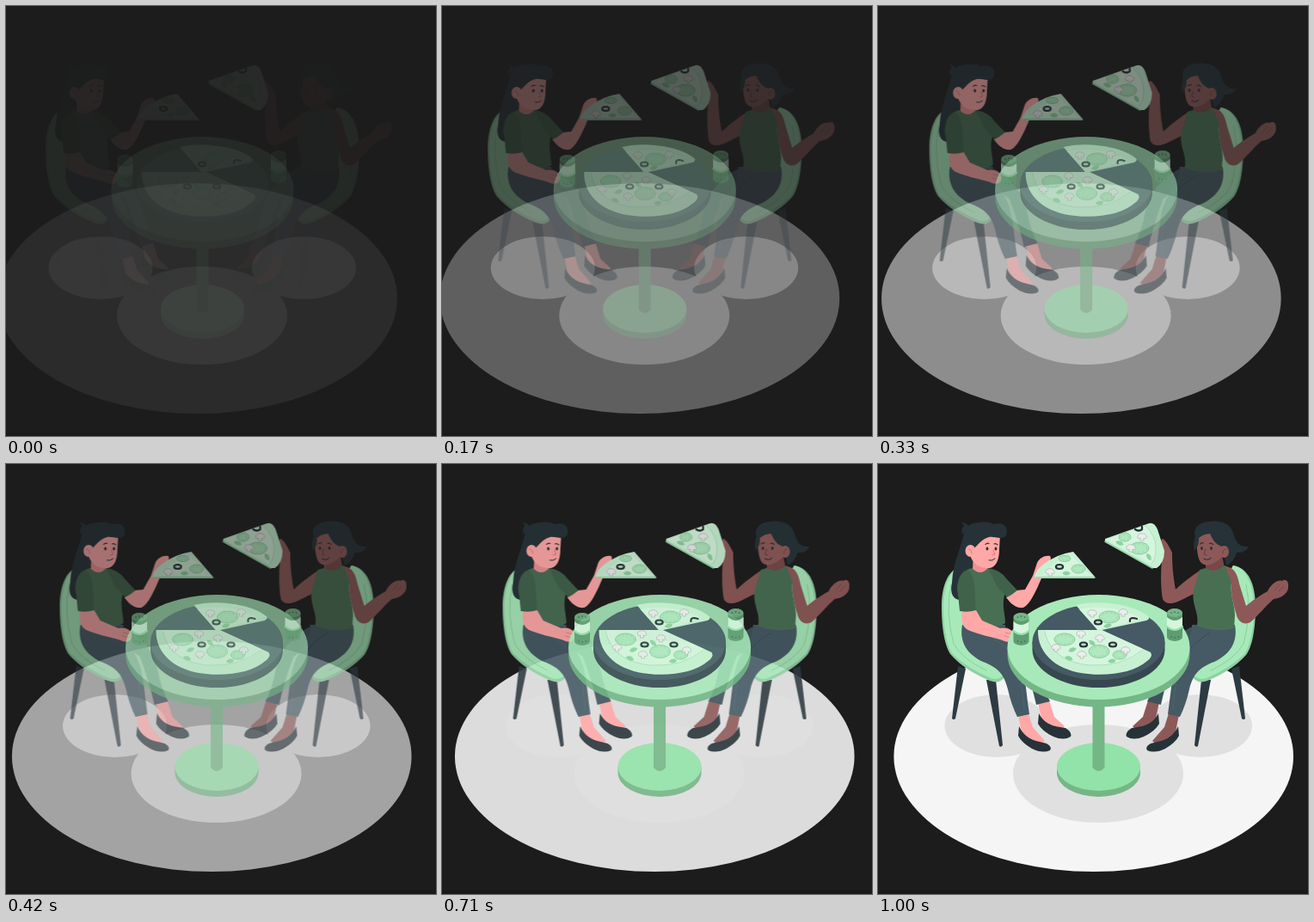
An HTML page that plays this animation: 500 px wide and 500 px high, repeating every 1.04 s.

```html
<!DOCTYPE html>
<html lang="en">
<head>
<meta charset="utf-8">
<title>Pizza for two</title>
<style>
  html, body { margin: 0; width: 100%; height: 100%; overflow: hidden; background: #1c1c1c; }
  svg { display: block; width: 100%; height: 100%; }
</style>
</head>
<body>
<svg id="stage" viewBox="0 0 500 500"></svg>
<script>
const INK = '#263238', PAN = '#455a64', PAN_SIDE = '#37474f', LEG = '#2d3a41';
const MINT = '#a8e9ba', GREEN = '#92e3a9', SHADE = '#75b687', CREAM = '#d6f5de', CRUST = '#c8f1d3';
const SHIRT = '#496f53', SLEEVE = '#40624a', PALE = '#ffa8a7', BROWN = '#8d5958';

const path = (d, fill, extra = '') => `<path d="${d}" fill="${fill}" ${extra}/>`;
const line = (d, color, width = 1) =>
  path(d, 'none', `stroke="${color}" stroke-width="${width}" stroke-linecap="round" stroke-linejoin="round"`);
const oval = (x, y, rx, ry, fill, extra = '') =>
  `<ellipse cx="${x}" cy="${y}" rx="${rx}" ry="${ry}" fill="${fill}" ${extra}/>`;
const mirror = art => `<g transform="translate(513 0) scale(-1 1)">${art}</g>`;

// An upright drum: the side wall, then the top face.
const drum = (x, y, rx, ry, h, top, side) =>
  path(`M${x - rx} ${y}v${h}a${rx} ${ry} 0 0 0 ${2 * rx} 0v${-h}z`, side) + oval(x, y, rx, ry, top);

// Toppings
const olive = (x, y) => oval(x, y, 4.1, 2.5, '#b5dfc2', `stroke="${INK}" stroke-width="2.2"`);
const pepper = (x, y, rx = 11, ry = 7) =>
  oval(x, y, rx, ry, '#b0e8bf', 'stroke="#7cc28f" stroke-width=".8"') +
  oval(x, y, rx - 2.5, ry - 2, 'none', 'stroke="#93d5a4" stroke-width=".7" stroke-dasharray="3 2"');
const mushroom = (x, y) =>
  path(`M${x - 5} ${y}c-1-5 9-6 10-1c1 3-2 3-3 2l0 3h-4l0-3c-2 1-3 1-3-1z`, '#ededed',
    'stroke="#a9b5ae" stroke-width=".7"');
const leaf = (x, y, turn) =>
  `<path d="M-5 0q5-5 10 0q-5 5-10 0z" fill="#8dd39f" transform="translate(${x} ${y}) rotate(${turn})"/>`;

const chair =
  path('M93 235l9 3-12 58q-2 2-4 0z', LEG) +
  path('M126 251h11l8 76q-2 3-4 1z', LEG) +
  path('M100 118C82 121 74 140 74 166C74 192 78 213 85 222Q101 240 130 252Q141 256 146 249V242L118 200L104 125z', '#8fd0a2') +
  path('M100 118C85 121 77 138 76 165C76 190 80 212 87 221Q103 237 131 249Q141 252 146 245Q148 240 139 235L118 200L104 125z', MINT) +
  line('M85 140Q78 172 88 209Q98 227 126 240', '#83c896', .8);

const leg = skin =>
  path('M186 277l13-2 6 19 12 11-6 6-20-10z', skin) +
  path('M187 290q7 14 25 16l6 1q8 5 6 10q-8 5-20 0q-13-6-18-15z', INK) +
  path('M120 190h30C173 204 184 220 188 240Q192 262 200 276L184 280C180 262 175 245 167 224z', '#3e525b') +
  path('M163 291l12-1 5 16 14 16-6 5-20-10z', skin) +
  path('M164 305q7 15 24 18l8 2q7 4 4 8q-9 4-21-2q-12-7-16-15z', INK) +
  path('M98 187C94 208 105 222 122 230C141 237 147 246 151 262Q155 280 162 294L176 291C172 264 171 240 164 226C157 212 148 202 148 187z', PAN) +
  line('M129 199Q151 212 160 228Q167 246 170 286', '#53666f', .8);

const eyes = (x, y, gap) =>
  oval(x, y, 1.4, 1.9, INK) + oval(x + gap, y, 1.4, 1.9, INK) +
  line(`M${x - 2} ${y - 5}q2-2 4-1M${x + gap - 2} ${y - 5.5}q2-1 4 1`, INK, 1.1);

const leftWoman =
  path('M101 75C98 95 87 114 86 138C83 151 88 159 98 158Q108 158 113 145L114 88z', INK) +
  leg(PALE) +
  path('M111 104L128 112 128 123 118 133 110 122z', '#f08f91') +
  path('M109 121C97 124 93 135 93 150L97 170 112 172 114 185C124 192 140 191 148 185C148 173 143 164 148 149L128 121Q119 131 109 121z', SHIRT) +
  path('M161 147L149 155C155 164 162 168 169 167C177 163 184 147 190 133L194 120C198 114 203 111 200 107C194 106 188 109 185 115L180 130 171 146z', PALE) +
  path('M128 121Q142 123 149 133L162 147Q156 152 150 155L138 142z', SLEEVE) +
  path('M98 168C96 184 98 190 107 194C122 200 138 202 147 206C156 209 160 202 157 195C153 191 148 190 142 191L121 182 114 170z', PALE) +
  line('M148 196l8 2M147 200l8 2', '#e57f84', .9) +
  path('M104 123C92 127 91 145 93 151L95 171Q105 173 114 170C112 152 115 132 104 123z', SLEEVE) +
  path('M107 84V106C110 115 117 121 127 121C138 122 141 110 141 99L142 82 130 74z', PALE) +
  path('M100 83C99 73 108 68 118 68C126 67 131 68 134 70C147 67 152 74 149 83C144 89 136 84 129 85C121 87 117 93 112 98L106 111Q99 101 100 83z', INK) +
  path('M98 82q-2-7 2-10l-3-4q5 0 8 4z', INK) +
  oval(107.5, 101, 6, 7, PALE) + line('M105 99q4 0 4 5', '#d97479', .9) +
  eyes(127, 98.5, 10) + line('M134 100l2 5-3 1', '#d97479', 1) + line('M129 112q4 1 7-2', INK, 1);

const rightWoman =
  mirror(leg(BROWN)) +
  line('M385 197Q368 208 358 220', '#37474f', .9) +
  path('M381 111L400 106 403 121 390 130 381 123z', '#774848') +
  path('M374 124C362 132 352 140 346 146C343 130 342 116 342 103C338 95 334 87 330 87C328 91 329 98 331 104C328 125 329 146 331 157C335 165 346 162 353 158L369 150z', BROWN) +
  path('M381 121Q391 128 403 118Q412 121 411 138C409 151 415 164 415 176L414 191C400 195 382 193 371 188C374 173 364 163 367 147Q371 133 374 123z', SHIRT) +
  path('M404 119C414 120 418 128 420 139L428 165C436 158 446 152 453 148C457 139 466 134 470 136C473 133 478 136 477 142C478 149 470 156 460 157C451 165 441 177 433 184C425 188 419 183 417 176C412 160 410 149 411 137z', BROWN) +
  line('M467 140l-6 7M472 142l-6 6', '#724444', .8) +
  path('M371 80C370 96 371 108 375 114C380 120 390 118 400 108L402 82 386 73z', BROWN) +
  path('M369 84C366 75 373 67 386 67C399 65 410 70 413 80C416 91 420 97 431 96Q427 104 417 103Q414 114 405 118L400 96C393 94 389 88 386 81Q378 81 372 87z', INK) +
  path('M373 84q1 11-5 17q-2-8 1-17z', INK) +
  oval(402.5, 102, 5.5, 7, BROWN) + line('M404 99q-4 1-3 5', '#683e3f', .9) +
  eyes(376.5, 98, 11) + line('M381 99l-2 6 3 1', '#643b3c', 1) + line('M379 110q5 3 8-1', INK, 1.1);

const table =
  drum(256.5, 352, 48.5, 28, 7, GREEN, SHADE) +
  path('M249.500 268h14v85q-7 8-14 0z', SHADE) +
  drum(256.5, 213, 106, 61, 8.5, MINT, SHADE);

const pizza =
  drum(256.5, 207, 77, 44, 9, PAN, PAN_SIDE) +
  path('M186 193H260L317 219Q320 224 313 229C298 242 270 247 244 244C210 241 185 222 186 193z', CRUST) +
  path('M194 193H260L308 215C300 228 274 235 246 234C216 231 198 216 194 193z', CREAM) +
  line('M194 195C198 217 216 231 246 234Q283 236 307 217', '#a4dab3', .8) +
  pepper(217, 204, 12, 7) + pepper(257, 218, 12, 7.5) + pepper(281, 222, 8, 5) +
  mushroom(236, 198) + mushroom(288, 217) + mushroom(237, 222) + mushroom(258, 203) + mushroom(207, 214) +
  leaf(226, 216, -20) + leaf(249, 208, 40) + leaf(272, 229, -10) + leaf(222, 226, 20) +
  olive(239, 210) + olive(273, 210) +
  path('M230 164C250 158 295 161 314 177Q317 180 312 182L256 194z', CRUST) +
  path('M234 169C253 164 288 167 305 180L256 193z', CREAM) +
  pepper(269, 178, 12, 7) + mushroom(249, 174) + mushroom(285, 173) + leaf(267, 188, -15) +
  olive(256, 184) + line('M293 183q-1-4 4-4l4 1', INK, 2.2);

const leftSlice =
  path('M182 131Q183 124 192 117 207 105 227 102L252 131V133H182z', CRUST) +
  path('M192 129Q205 112 226 107L247 130z', CREAM) +
  pepper(233, 122, 8, 5) + pepper(217, 110, 7, 3.5) + mushroom(200, 126) + leaf(219, 127, 0) +
  olive(211, 119.5) + line('M183 132H252', '#8fd3a2', 1.6);

const rightSlice =
  path('M264 87L315 69Q321 67 325 76L333 101Q333 115 324 121L319 121 264 91z', CRUST) +
  path('M266 88L311 72Q323 83 323 97 324 109 318 116z', CREAM) +
  line('M311 72Q323 83 323 97 324 109 318 116', '#a4dab3', .8) +
  pepper(304, 98, 11, 7) + pepper(287, 85, 7, 5) + mushroom(307, 85) + mushroom(294, 98) +
  leaf(315, 108, 60) + leaf(281, 92, 20) + line('M299 76q4 3 8 0l0-3', INK, 2.3) +
  line('M264 90L319 121', '#8fd3a2', 1.6);

const shaker = (x, y) =>
  drum(x, y, 9, 5, 28, SHADE, '#609c71') +
  path(`M${x - 9} ${y + 5}q9 8 18 0v11q-9 8-18 0z`, CREAM) +
  line(`M${x - 9} ${y + 16}q9 8 18 0`, GREEN, 2) +
  [-4, 0, 4].map(d => oval(x + d, y - 1 + Math.abs(d) / 4, .8, .6, INK)).join('') +
  line(`M${x - 4} ${y + 28}h.1m4 1h.1m4-1h.1`, '#37664a', 1.4);

const layers = [
  oval(250.7, 340, 232.3, 134, '#f5f5f5'),
  oval(138, 304.5, 60.5, 36.5, '#e0e0e0') + oval(374.5, 304.5, 60.5, 36.5, '#e0e0e0') +
    oval(256, 360, 99, 57, '#e0e0e0'),
  chair + mirror(chair) + leftWoman + rightWoman + leftSlice + rightSlice,
  table,
  pizza,
  shaker(166.5, 178) + shaker(345, 173)
];

const stage = document.getElementById('stage');
stage.innerHTML = '<rect y="496" width="500" height="4" fill="#191919"/>' +
  layers.map(art => `<g class="layer">${art}</g>`).join('');
const groups = [...stage.querySelectorAll('.layer')];

const LOOP = 1040, STEPS = 25, SLIDE = 30;

// cubic-bezier(0, 0, .58, 1), solved by bisection
function easeOut(x) {
  if (x >= 1) return 1;
  let low = 0, high = 1;
  for (let i = 0; i < 24; i++) {
    const s = (low + high) / 2;
    if (1.74 * (1 - s) * s * s + s ** 3 < x) low = s; else high = s;
  }
  return 3 * low * low - 2 * low ** 3;
}

function render(time) {
  const step = Math.min(STEPS - 1, Math.floor((time % LOOP + 5) / (LOOP / STEPS)));
  const progress = easeOut((step + 1) / STEPS);
  for (const group of groups) {
    group.setAttribute('transform', `translate(${SLIDE * (progress - 1)} 0)`);
    group.setAttribute('opacity', progress);
  }
}

const start = performance.now();
function tick() {
  render(performance.now() - start);
  requestAnimationFrame(tick);
}
tick();
</script>
</body>
</html>
```
